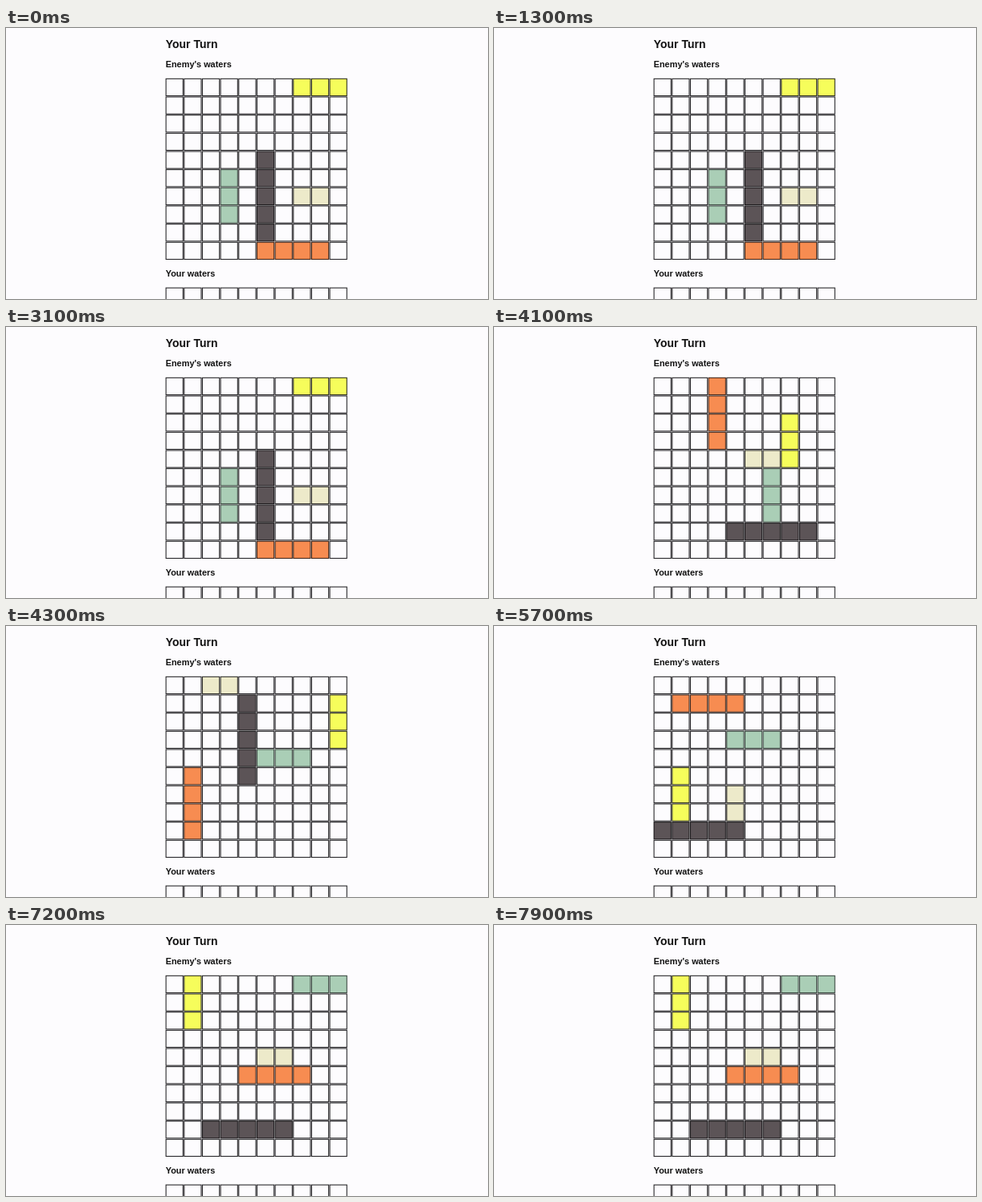
Recreate the animation shown at these times as an HTML page with a canvas. Size 600 by 338 pixels, loop 8 s.

```html
<!DOCTYPE html>
<html lang="en">
<head>
<meta charset="utf-8">
<title>Battleship</title>
<style>
  html, body { margin: 0; width: 100%; height: 100%; overflow: hidden; background: #fdfcfe; }
  canvas { position: absolute; left: 0; top: 0; }
  h2, h3 {
    position: absolute; left: 198.7px; margin: 0; white-space: nowrap; color: #111;
    font-family: "Liberation Sans", Arial, sans-serif; font-weight: bold;
  }
  h2 { top: 11.9px; font-size: 14px; line-height: 16px; }
  h3 { font-size: 10.92px; line-height: 12px; }
</style>
</head>
<body>
<canvas id="board"></canvas>
<h2>Your Turn</h2>
<h3 style="top:39.2px">Enemy's waters</h3>
<h3 style="top:299.9px">Your waters</h3>
<script>
const canvas = document.getElementById('board');
const ctx = canvas.getContext('2d');
const ratio = window.devicePixelRatio || 1;
canvas.width = 600 * ratio;
canvas.height = 338 * ratio;
canvas.style.width = '600px';
canvas.style.height = '338px';
ctx.scale(ratio, ratio);

const LOOP = 8000, LEFT = 198.6, PITCH = 22.66, SIZE = 22.3, LINE = 1.1;
const EMPTY = { fill: '#fdfcfe', edge: '#29282b' };
const ships = [
  { length: 3, fill: '#f6fd5b', edge: '#34351f' },
  { length: 3, fill: '#aaceb6', edge: '#3f4d45' },
  { length: 2, fill: '#edeaca', edge: '#33322d' },
  { length: 4, fill: '#f78c51', edge: '#46291b' },
  { length: 5, fill: '#5c5457', edge: '#1d1b1d' }
];

// Fleets in board notation: column letter, row digit, > across or v down
const fleets = [
  { start: 0,    moves: 'H0> D5v H6> F9> F4v' },
  { start: 3300, moves: 'H2v G5v F4> D0v E8>' },
  { start: 4200, moves: 'J1v F4> C0> B5v E1v' },
  { start: 4400, moves: 'B5v E3> E6v B1> A8>' },
  { start: 7100, moves: 'B0v H0> F4> E5> C8>' }
];

function placeFleet(moves) {
  const cells = Array(100).fill(EMPTY);
  moves.split(' ').forEach(([col, row, heading], i) => {
    const first = row * 10 + 'ABCDEFGHIJ'.indexOf(col);
    const step = heading === 'v' ? 10 : 1;
    for (let k = 0; k < ships[i].length; k++) cells[first + k * step] = ships[i];
  });
  return cells;
}

function drawGrid(top, cells) {
  cells.forEach(({ fill, edge }, i) => {
    const x = LEFT + (i % 10) * PITCH;
    const y = top + Math.floor(i / 10) * PITCH;
    ctx.fillStyle = edge;
    ctx.fillRect(x, y, SIZE, SIZE);
    ctx.fillStyle = fill;
    ctx.fillRect(x + LINE, y + LINE, SIZE - 2 * LINE, SIZE - 2 * LINE);
  });
}

const began = performance.now();
let shown = null;

function frame() {
  const time = (performance.now() - began) % LOOP;
  const fleet = fleets.filter(f => f.start <= time).pop();
  if (fleet !== shown) {
    shown = fleet;
    ctx.fillStyle = EMPTY.fill;
    ctx.fillRect(0, 0, 600, 338);
    drawGrid(62.8, placeFleet(fleet.moves));
    drawGrid(323.6, Array(100).fill(EMPTY));
  }
  requestAnimationFrame(frame);
}
frame();
</script>
</body>
</html>
```
